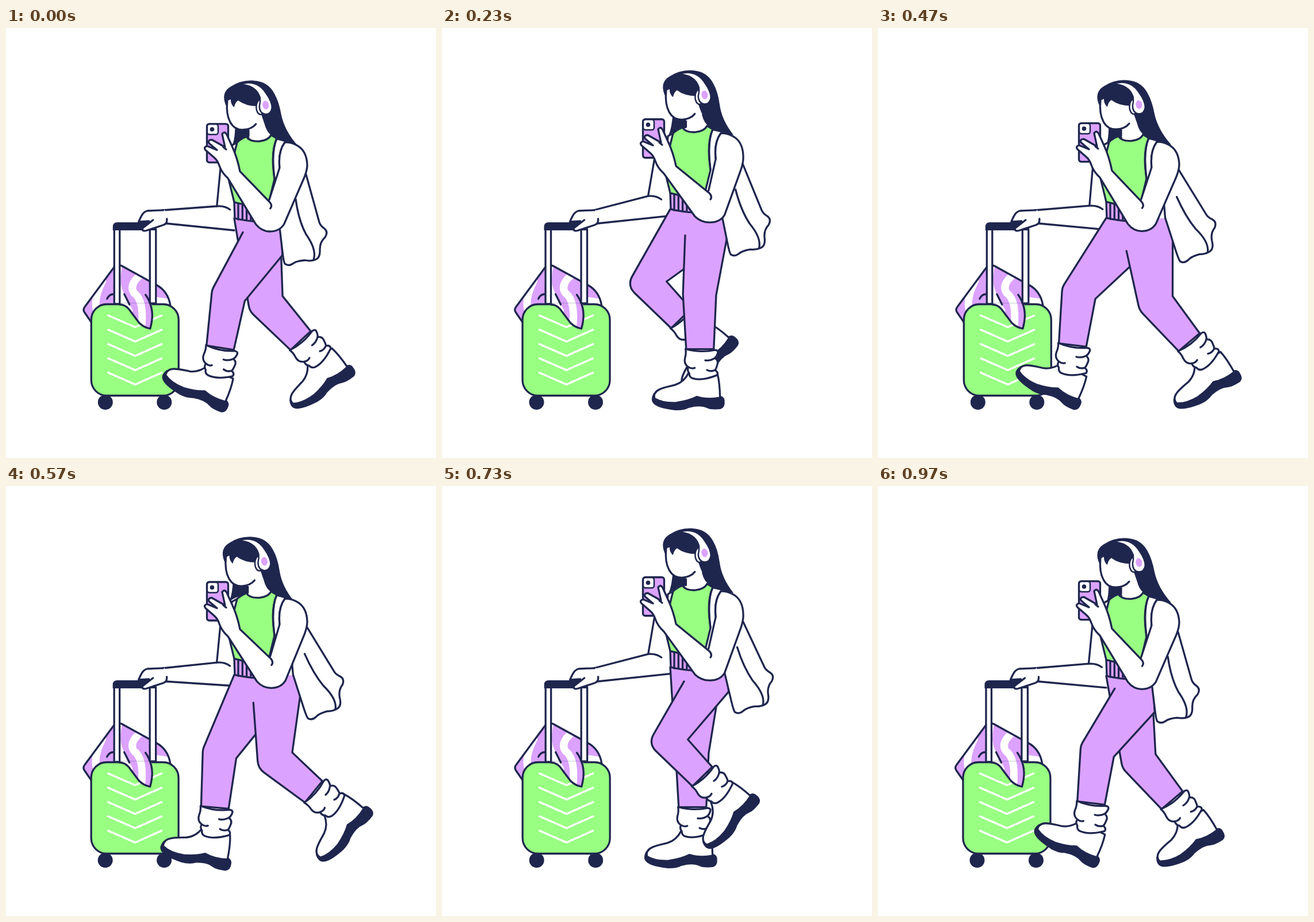
Animation, 748 px wide and 748 px high, one loop 1.01 s. Source, as an HTML page:

```html
<!DOCTYPE html>
<html lang="en">
<head>
<meta charset="utf-8">
<title>Traveller walking</title>
<style>
  html, body { margin: 0; width: 100%; height: 100%; overflow: hidden; background: #fff; }
  svg { display: block; width: 100%; height: 100%; }
</style>
</head>
<body>
<svg id="stage" viewBox="0 0 748 748" fill="none" stroke-linecap="round" stroke-linejoin="round"></svg>
<script>
const INK = '#1f264e', LILAC = '#dca2ff', LIME = '#98ff82', WHITE = '#fff';
const LOOP = 1010, FRAMES = 30, LINE = 3.3;

const clamp = v => Math.max(0, Math.min(1, v));
const mix = (a, b, u) => a + (b - a) * u;
const rad = deg => deg * Math.PI / 180;
const angle = f => f / FRAMES * 2 * Math.PI;

// Sum of [cos, sin] harmonics of the stride.
const wave = (f, mean, ...terms) => terms.reduce((sum, [c, s], i) => {
  const a = angle(f) * (i + 1);
  return sum + c * Math.cos(a) + s * Math.sin(a);
}, mean);

function turn([x, y], deg, [ox, oy] = [0, 0]) {
  const c = Math.cos(rad(deg)), s = Math.sin(rad(deg));
  return [ox + (x - ox) * c - (y - oy) * s, oy + (x - ox) * s + (y - oy) * c];
}
const add = ([x, y], [dx, dy]) => [x + dx, y + dy];

// Sends every coordinate pair of a path through a function.
const warp = (d, fn) => d.replace(/(-?[\d.]+)[ ,](-?[\d.]+)/g,
  (_, x, y) => fn([+x, +y]).map(v => v.toFixed(2)).join(' '));

const path = (d, fill = 'none', stroke = INK, w = LINE) =>
  `<path d="${d}" fill="${fill}" stroke="${stroke}" stroke-width="${w}"/>`;
const shape = (d, fill) => path(d, fill, 'none');
const group = (x, y, body) => `<g transform="translate(${x.toFixed(2)} ${y.toFixed(2)})">${body}</g>`;
const points = pts => pts.map(p => p.map(v => v.toFixed(2)).join(' ')).join('L');
const poly = pts => 'M' + points(pts);
const toward = (a, b, r) => {
  const u = Math.min(0.5, r / Math.hypot(b[0] - a[0], b[1] - a[1]));
  return [mix(a[0], b[0], u), mix(a[1], b[1], u)];
};

// The body bounces twice per stride; the hips and the bag swing once.
const liftAt = f => wave(f, -8, [0, 0], [8, 0]);
function bodyAt(f) {
  const bounce = (mean, c, s) => wave(f, mean, [0, 0], [c, s]);
  return {
    lift: liftAt(f),
    headX: bounce(3.8, -3, -4.5),
    hairLag: bounce(-1, 0.5, -5.5),
    phone: bounce(-5, 4.3, 2.2),
    elbow: bounce(3.6, -3.8, 1.5),
    caseX: wave(f, -4, [-0.7, 0], [4.5, 0]),
    swing: wave(f, 5.7, [-5.7, -0.4]),
    crease: [wave(f, 422, [-10, 2]), wave(f, 360.5, [-15.5, 12], [10.5, 0])],
    seat: [wave(f, 497, [-16, 0]), wave(f, 372, [13, 3], [10, 0])]
  };
}

const CLOTH = 'M148 511L137 495Q133 490 138 484L186 419Q192 410 202 414L262 447Q282 458 286 482L255 492Q257 505 251 523Q240 521 232 513Q222 500 214 489Q207 481 198 481L165 482Q149 488 148 511Z';

function suitcase() {
  let s = `<clipPath id="cloth"><path d="${CLOTH}"/></clipPath>`;
  const stripes = 'M168 440Q152 470 158 492M197 408Q190 440 196 456Q202 472 214 492M236 428Q213 446 223 461Q241 474 236 520M258 474L292 479';
  const cloth = `<g clip-path="url(#cloth)">${shape('M120 400H300V530H120Z', LILAC)}${path(stripes, 'none', WHITE, 13)}</g>`;
  s += cloth + path('M148 511L137 495Q133 490 138 484L186 419Q192 410 202 414L262 447Q282 458 286 482');
  for (const x of [173, 275.5]) s += `<circle cx="${x}" cy="651" r="13" fill="${INK}"/>`;
  s += `<rect x="148.5" y="480.5" width="152" height="159" rx="27" fill="${LIME}" stroke="${INK}" stroke-width="${LINE}"/>`;
  for (let i = 0; i < 5; i++) {
    const y = 500 + i * 24.9;
    s += path(`M178 ${y}L225 ${y + 20.5}L271 ${y}`, 'none', WHITE, 3.5);
  }
  s += `<clipPath id="flap"><path d="M198 479H254V530H198Z"/></clipPath><g clip-path="url(#flap)">${cloth}</g>`;
  s += path('M198 481Q207 481 214 489Q222 500 232 513Q240 521 251 523Q257 502 253 486Q250 474 243 464');
  s += path('M176 471Q180 463 187 463M206 463L215 481');
  s += path('M188.5 350V480H198V350M250.5 350V479H261V350', WHITE);
  s += shape('M186 352V346Q186 338 194 338H255Q262 340 262 352Z', INK);
  return s;
}

function farArm({ lift, caseX }) {
  const elbow = [367 + caseX, 310 + lift * 1.12], [ex, ey] = elbow;
  const wristTop = [272 + caseX, 317], wristLow = [279 + caseX, 340];
  const top = [374 + caseX * 0.35, 235 + lift], low = [397, 352 + lift * 1.6];
  return shape(poly([wristTop, elbow, top, [400, 240 + lift], add(low, [5, -7]), low, wristLow]), WHITE)
    + path(poly([wristTop, elbow, top]))
    + path(poly([wristLow, low]))
    + path(`M${ex} ${ey}Q${ex + 14} ${ey - 1} ${ex + 23} ${ey + 6}`)
    + group(caseX, 0,
      shape('M232 338C235 328 239 320 246 318L276 316L281 333Q281 341 273 343L244 353Q236 354 238 348L250 338Z', WHITE)
      + path('M231 337C235 328 238 320 246 318L274 316.8M280 332Q281 341 273 343L244 352.5Q236 354 238 348L256 334M233 337L249 336'));
}

const SOCK = 'M-25 -2Q0 7 26 3Q33 4 30 10Q28 15 25 17Q32 22 28 30Q26 36 24 38Q30 42 27 47Q0 56 -16 50Q-22 47 -21 41Q-25 36 -22 30Q-30 24 -27 14Q-24 6 -25 -2Z';
const FOLDS = 'M25 17Q16 22 8 20M24 38Q16 41 10 37M-22 30Q-16 34 -11 32';
const SOLE = 'M-85 28Q-90 38 -86 43Q-80 52 -48 56Q-34 57 -24 52Q-4 47 8 53Q14 56 30 55Q38 53 37 42Q37 36 31 34L-10 32L-46 42Z';
const UPPER = 'M-24 -8Q-32 8 -48 13C-66 17 -88 20 -84 36Q-70 45 -46 44Q-24 41 -10 34Q8 40 30 36Q30 10 26 -6Z';

// Joints from swinging thigh, shin and shoe angles, in degrees from rest.
function legPose(f, shift) {
  const thigh = wave(f, 16.7, [17, -14], [-3.8, -1.9], [0, 2], [-1.7, 0]);
  const shin = wave(f, -21.8, [26, 16.7], [2.3, -3.2], [0, -2.8], [2.5, 0]);
  const shoe = wave(f, -15.2, [29, 17.3], [8.5, -11.7], [0, -3.7], [1.7, 0]);
  const flex = thigh - shin, mean = (thigh + shin) / 2, half = 28.5 + 0.08 * flex;
  const hip = [wave(f, 459, [-13, 0]) + shift, 355 + liftAt(f)];
  const knee = add(hip, turn([0, 125], thigh));
  const hem = add(knee, turn([0, wave(f, 90, [2, 4.6])], shin));
  return {
    shin, shoe, hem,
    round: flex * 0.25,
    kneeFront: add(knee, turn([-half, 0], mean)),
    kneeBack: add(knee, turn([half, 0], mean)),
    hemFront: add(hem, turn([-24, 0], shin)),
    hemBack: add(hem, turn([24, 0], shin))
  };
}

function leg(p, start, seat, hip) {
  const onSock = q => add(p.hem, turn(q, p.shin - 3));
  const ankle = onSock([1.5, 49]);
  const onShoe = q => add(ankle, turn(q, p.shoe));
  const { kneeFront, hemFront } = p;
  const pants = poly([start, toward(kneeFront, start, p.round)])
    + 'Q' + kneeFront.join(' ') + ' '
    + points([toward(kneeFront, hemFront, p.round), hemFront, p.hemBack, p.kneeBack, seat, hip]);
  return path(warp(SOLE, onShoe), INK, INK, 2)
    + path(warp(UPPER, onShoe), WHITE)
    + path(pants, LILAC)
    + path(warp(SOCK, onSock), WHITE)
    + path(warp(FOLDS, onSock));
}

function legs(f, { lift, crease, seat }) {
  const far = f + FRAMES / 2;
  const gap = wave(far - 7, -28, [12, 0], [3, 0]);
  const near = legPose(f, 0);
  const waist = [397, 331 + lift], hip = [seat[0] - 4, 332 + lift];
  return leg(legPose(far, gap), waist, [478, 378], [472, 332 + lift])
    + shape(poly([add(waist, [1, 0]), crease, near.kneeBack, seat, hip]), LILAC)
    + leg(near, crease, seat, hip);
}

function bag({ lift, swing }) {
  const hang = p => add(turn(p, -swing * clamp((p[1] - 215) / 100), [490, 200]), [0, lift]);
  return path(warp('M490 215L512 230L522 255L545 338Q547 344 554 349Q561 355 555 364Q546 372 546 385Q547 400 538 403Q530 406 520 404Q505 405 499 410Q491 415 485 410Q483 407 481 390L474 330Z', hang), WHITE)
    + path(warp('M504 298Q509 335 522 359Q541 386 535 403', hang));
}

function hair({ lift, headX, hairLag }) {
  const fall = ([x, y]) => {
    const u = clamp((y - 140) / 60);
    return [x + headX * (1 - u / 2) + hairLag * u, y + lift * 1.12];
  };
  return shape(warp('M394 204Q399 190 398 165L381 133Q373 112 390 102Q408 90 430 91.5Q455 93 466 114Q474 128 478 150Q484 178 507 204L470 196L450 180L420 193Q405 195 394 204Z', fall), INK);
}

function torso({ lift }) {
  let stripes = '';
  for (let x = 404; x < 435; x += 7.3) stripes += `M${x} 305V333`;
  return group(0, lift,
    path('M402 199L393 204L390 240L400 250Z', WHITE)
    + path('M397 303L470 312V338Q425 338 398 331Z', LILAC)
    + path(stripes)
    + shape('M466 193L485 198L478 243L466 275Z', WHITE)
    + path('M418 189Q424 198 441 197Q457 195 461 186L471 192Q462 212 465 245L467 263L458 300L446 314Q420 309 397 303L387 262L398 215L402 199Q408 193 418 189Z', LIME)
    + path('M471 192Q461 215 467 262M485 199Q473 215 476 243'));
}

function neck({ lift, headX }) {
  return group(headX / 2, lift,
    shape('M421 165V187Q426 199 442 198Q457 196 462 187Q453 182 449 166L440 140Z', WHITE)
    + path('M421.5 178V188'));
}

function head({ lift, headX }) {
  return group(headX, lift * 1.12,
    shape('M384 127C381 158 392 178 412 177Q427 176 436 166L447 168Q438 150 437 136Q416 136 403 126Q398 129 396 138Q390 133 390 124Z', WHITE)
    + path('M384 127C381 158 392 178 412 177Q427 176 434 167')
    + `<ellipse cx="442" cy="137.5" rx="7.5" ry="13" fill="${WHITE}" stroke="${INK}" stroke-width="2.5"/>`
    + path('M405 98Q436 88 452 114Q462 128 462 139Q460 151 450 150Q440 148 440 136Q442 128 441 121Q434 99 405 98Z', WHITE, INK, 2.5)
    + `<ellipse cx="451" cy="134" rx="5.5" ry="7.5" fill="${LILAC}" transform="rotate(-10 451 134)"/>`);
}

function nearArm({ lift, phone, elbow }) {
  const reach = ([x, y]) => {
    const u = clamp((x - 400) / 50);
    return [x + elbow * u * clamp((y - 240) / 80), y + mix(phone, lift, u)];
  };
  const hand = 'L407 250Q402 225 393 206L384 186Q380 179 376 185L381 208L358 195Q351 195 353 201L367 213L350 206Q343 208 347 213L362 226Q368 231 371 240Q375 252 386 262L435 342';
  const outer = 'Q445 354 459 354Q476 354 484 341L518 262Q524 248 524 238Q523 212 504 203Q494 198 485 199';
  const device = `<rect x="349.5" y="167.5" width="37" height="67" rx="4" fill="${LILAC}" stroke="${INK}" stroke-width="${LINE}"/>`
    + `<rect x="350" y="168" width="19" height="18" rx="4" fill="${WHITE}" stroke="${INK}" stroke-width="2.5"/>`
    + `<circle cx="358.5" cy="177" r="3.8" fill="${INK}"/>`;
  return group(0, phone, device)
    + shape(warp('M458 301' + hand + outer + 'Q473 215 476 243Z', reach), WHITE)
    + path(warp('M460 314Q464 309 459 303' + hand + outer, reach))
    + path(warp('M485 199Q473 215 476 243L458 299', reach))
    + path(warp('M378 208L383 212', reach));
}

function scene(f) {
  const b = bodyAt(f);
  return group(b.caseX, 0, suitcase()) + farArm(b) + legs(f, b) + bag(b)
    + hair(b) + neck(b) + torso(b) + head(b) + nearArm(b);
}

const stage = document.getElementById('stage');
let shown = -1;
function draw() {
  const t = performance.now() % LOOP;
  const f = Math.min(FRAMES - 1, Math.floor((t + 5) * 0.03));
  if (f !== shown) stage.innerHTML = scene(shown = f);
  requestAnimationFrame(draw);
}
draw();
</script>
</body>
</html>
```
